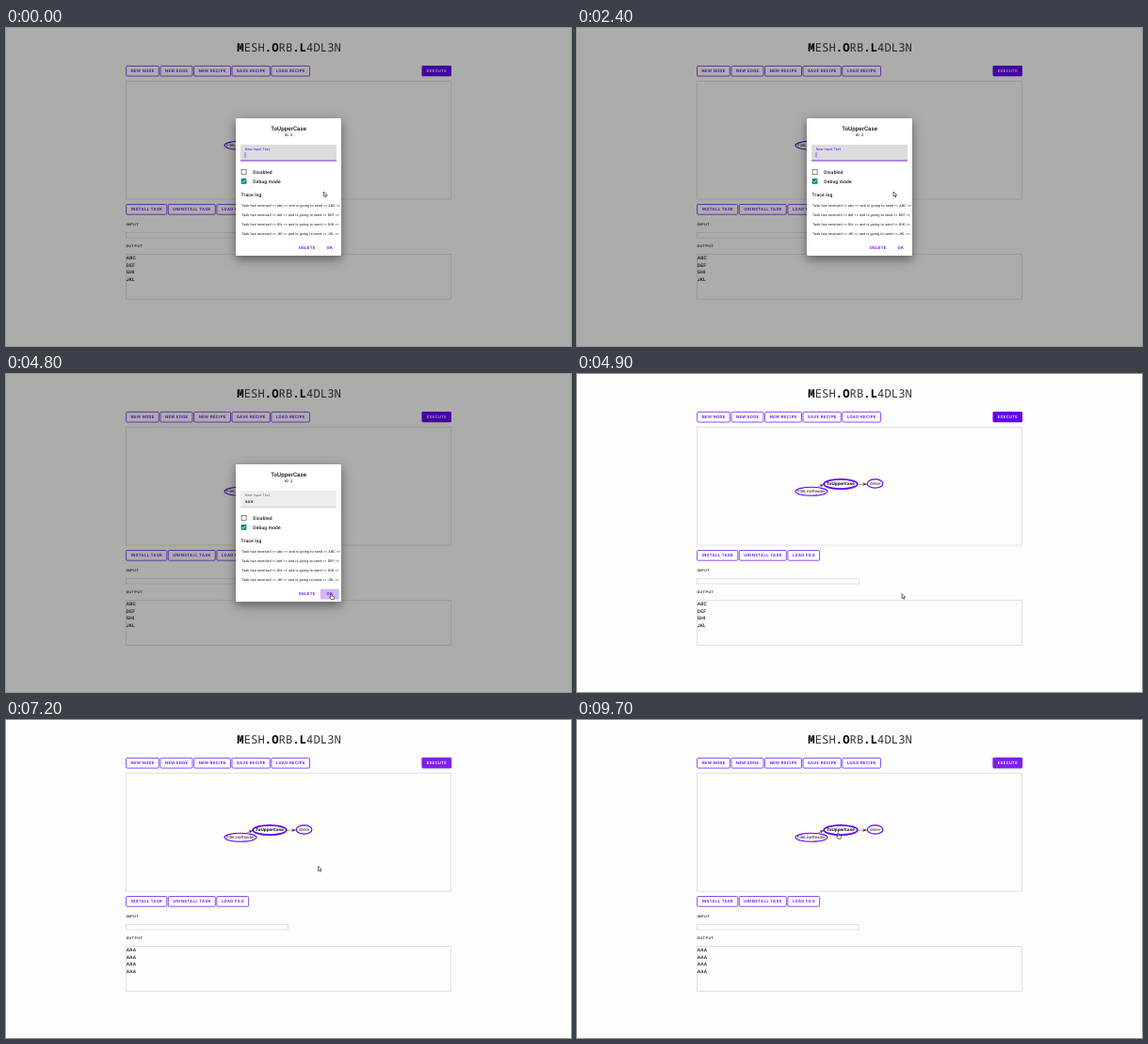
Animation, 600 px wide and 338 px high, one loop 9800 ms. Source, as an HTML page:

```html
<!DOCTYPE html>
<html lang="en">
<head>
<meta charset="utf-8">
<title>Recipe editor</title>
<style>
  html, body { margin: 0; width: 100%; height: 100%; overflow: hidden; background: #fdfdfc; }
  svg { display: block; width: 100vw; height: 100vh; }
  text { font-family: Roboto, sans-serif; text-rendering: geometricPrecision; white-space: pre; }
  .logo { font: 200 12.2px "Noto Sans Mono", monospace; letter-spacing: .06px; fill: #333; }
  .logo tspan { font-weight: 800; fill: #000; }
  .btn { font-size: 4.4px; font-weight: 500; letter-spacing: .39px; fill: #6200ee; }
  .over { font-size: 3.72px; font-weight: 500; letter-spacing: .62px; fill: #111; }
  .body { font-size: 4.96px; font-weight: 500; letter-spacing: .15px; fill: #151515; }
  .head { font-size: 6.2px; font-weight: 500; letter-spacing: .08px; fill: #111; }
  .small { font-size: 3.72px; letter-spacing: .125px; fill: #111; }
  .node { font: 4.4px "Liberation Sans", Arial, sans-serif; fill: #222; }
  .picked { font-weight: 700; font-size: 4.6px; fill: #000; }
  .box { fill: none; stroke: #d6d6d6; stroke-width: .7; }
  .shadow { filter: drop-shadow(0 4px 4px rgba(0,0,0,.3)) drop-shadow(0 2px 7px rgba(0,0,0,.2)); }
</style>
</head>
<body>
<svg id="stage" viewBox="0 0 600 338" preserveAspectRatio="none"></svg>
<script>
const LOOP = 9800, STEP = 100;
const PURPLE = '#6200ee';
const T = { typing: [2500, 2700, 2900], hoverOk: 4000, press: 4600, closed: 4900,
            hoverRun: 6000, run: 6300, leaveRun: 6700, hoverNode: 9100 };

// time, x, y of the pointer tip
const POINTER = [
  [0, 337.5, 174], [1000, 337.5, 174], [1300, 336, 174], [3100, 336, 174],
  [3500, 335.5, 184], [4000, 343.5, 233.5], [4900, 345, 233.5], [5200, 345, 233.5],
  [6000, 457, 46], [6600, 457, 46], [7200, 331.5, 155.5], [8300, 331.5, 155.5],
  [9000, 308, 123], [9100, 277, 120], [LOOP, 277, 120]
];

const attrs = o => Object.entries(o).map(([k, v]) => ` ${k}="${v}"`).join('');
const tag = (name, o, inner = '') => `<${name}${attrs(o)}>${inner}</${name}>`;
const text = (cls, x, y, s, o = {}) => tag('text', { class: cls, x, y, ...o }, s);
const mid = { 'text-anchor': 'middle' };
const rect = (x, y, r, b, o) => tag('rect', { x, y, width: r - x, height: b - y, ...o });
const escape = s => s.replace(/</g, '&lt;').replace(/>/g, '&gt;');

const button = (x, r, y, label) =>
  rect(x, y, r, y + 10.7, { rx: 1.2, fill: '#fff', stroke: PURPLE, 'stroke-width': .7 }) +
  text('btn', (x + r) / 2 + .2, y + 6.9, label, mid);

const node = (x, y, rx, ry, label, picked) =>
  tag('ellipse', { cx: x, cy: y, rx, ry, fill: '#fdfdfc', stroke: PURPLE, 'stroke-width': picked ? 1.7 : 1.1 }) +
  text(picked ? 'node picked' : 'node', x, y + 1.3, label, mid);

const edge = (x1, y1, x2, y2) => {
  const angle = Math.atan2(y2 - y1, x2 - x1) * 180 / Math.PI;
  return tag('path', { d: `M${x1} ${y1}L${x2} ${y2}`, stroke: '#777', 'stroke-width': .6 }) +
    tag('path', { d: 'M0 0L-5 -1.7L-3.8 0L-5 1.7Z', fill: '#444', transform: `translate(${x2} ${y2}) rotate(${angle})` });
};

const page = [
  text('logo', 300.6, 24.5, '<tspan>M</tspan>ESH<tspan>.O</tspan>RB<tspan>.L</tspan>4DL3N', mid),
  button(127.6, 162.3, 40.4, 'NEW NODE'),
  button(164, 198, 40.4, 'NEW EDGE'),
  button(199.6, 238.5, 40.4, 'NEW RECIPE'),
  button(240, 280.3, 40.4, 'SAVE RECIPE'),
  button(281.8, 322.5, 40.4, 'LOAD RECIPE'),
  rect(441.6, 40.1, 473, 51.3, { id: 'run', rx: 1.2 }),
  text('btn', 457.4, 47.3, 'EXECUTE', { ...mid, style: 'fill:#fff' }),
  rect(127.5, 56.5, 472.5, 182, { class: 'box' }),
  edge(253, 121.3, 262.5, 117.2),
  edge(298, 117.5, 308.2, 117),
  node(249, 124.8, 17, 4.5, 'FileLineReader'),
  node(280, 117, 17.8, 5.1, 'ToUpperCase', true),
  node(316.6, 116.5, 8.3, 4.6, 'Writer'),
  button(127.6, 170.8, 187.5, 'INSTALL TASK'),
  button(172.3, 222.3, 187.5, 'UNINSTALL TASK'),
  button(223.9, 257.6, 187.5, 'LOAD FILE'),
  text('over', 127.4, 209.8, 'INPUT'),
  rect(127.5, 217.3, 299.5, 223, { class: 'box' }),
  text('over', 127.4, 233.2, 'OUTPUT'),
  rect(127.5, 240.5, 472.5, 288.2, { class: 'box' }),
  ...[0, 1, 2, 3].map(i => text('body out', 127.8, 246.4 + 7.5 * i, ''))
];

const traces = [['abc', 'ABC'], ['def', 'DEF'], ['Ghi', 'GHI'], ['JKl', 'JKL']];
const dialog = tag('g', { id: 'dialog' }, [
  rect(0, 0, 600, 338, { fill: '#000', opacity: .32 }),
  rect(244, 96, 356, 242, { class: 'shadow', rx: 1.2, fill: '#fff' }),
  text('head', 300.2, 108.5, 'ToUpperCase', mid),
  text('over', 300.2, 115.2, 'ID 2', mid),
  tag('path', { id: 'field', d: 'M249 141.4V125.2Q249 124 250.2 124H349.8Q351 124 351 125.2V141.4Z' }),
  rect(249, 140.6, 351, 141.4, { id: 'underline' }),
  text('small', 253.7, 130, 'New Input Text', { id: 'label' }),
  text('body', 253.7, 136.7, '', { id: 'value', style: 'font-weight:400' }),
  rect(0, 132.2, .6, 137.8, { id: 'caret', fill: PURPLE }),
  rect(250.1, 150.4, 255.1, 155.4, { fill: '#fff', stroke: '#555', 'stroke-width': .7 }),
  rect(249.7, 160, 255.4, 165.7, { rx: .5, fill: '#018786' }),
  tag('path', { d: 'M250.8 163L252 164.2L254.4 161.6', fill: 'none', stroke: '#fff', 'stroke-width': .8 }),
  text('body', 262.3, 154.7, 'Disabled'),
  text('body', 262.3, 164.7, 'Debug mode'),
  text('body', 249.6, 179.3, 'Trace log'),
  ...traces.map(([from, to], i) => text('small', 250, 189.5 + 10 * i,
    escape(`Task has received << ${from} >> and is going to send << ${to} >>`))),
  rect(333.8, 228.4, 353.7, 239.4, { id: 'ok', rx: 1.2, fill: PURPLE }),
  text('btn', 319.8, 235.4, 'DELETE', mid),
  text('btn', 343.9, 235.4, 'OK', mid)
].join(''));

const pointer = tag('g', { id: 'pointer', fill: '#fff', stroke: '#111', 'stroke-width': .6, 'stroke-linejoin': 'round' },
  tag('path', { id: 'arrow', d: 'M0 0V5L1.2 4L2 5.8L2.9 5.4L2.1 3.7H3.7Z' }) +
  tag('path', { id: 'hand', d: 'M0 0Q.6 -.4 1 .2V2.4L3.2 2.9Q3.8 3.1 3.7 3.8L3.2 6.2H.4L-1.4 3.9Q-1.3 3.1 -.6 3.4L0 3.9Z' }));

const stage = document.getElementById('stage');
stage.innerHTML = page.join('') + dialog + pointer;
const $ = id => document.getElementById(id);
const set = (id, o) => { for (const k in o) $(id).setAttribute(k, o[k]); };
const show = (id, on) => set(id, { visibility: on ? 'visible' : 'hidden' });
const outputs = [...document.querySelectorAll('.out')];
const between = (t, a, b) => t >= a && t < b;

function pointerAt(t) {
  const i = Math.max(1, POINTER.findIndex(p => p[0] > t));
  const [t0, x0, y0] = POINTER[i - 1], [t1, x1, y1] = POINTER[i];
  const p = (t - t0) / (t1 - t0), e = p * p * (3 - 2 * p);
  return [x0 + (x1 - x0) * e, y0 + (y1 - y0) * e];
}

function draw(t) {
  const open = t < T.closed, focused = t < T.press;
  const typed = T.typing.filter(k => t >= k).length;
  set('dialog', { display: open ? 'inline' : 'none' });
  set('field', { fill: focused ? '#dcdcdc' : '#ededed' });
  set('underline', { fill: focused ? PURPLE : '#999', y: focused ? 140.6 : 141, height: focused ? .8 : .4 });
  $('label').style.fill = focused ? PURPLE : '#666';
  $('value').textContent = 'a'.repeat(typed);
  set('caret', { x: 253.7 + typed * 2.85, display: focused && t % 1000 < 500 ? 'inline' : 'none' });
  set('ok', { opacity: t < T.hoverOk ? 0 : t < T.press ? .06 : .28 });

  const done = t >= T.run;
  outputs.forEach((line, i) => line.textContent = done ? 'AAA' : traces[i][1]);
  set('run', { fill: done ? '#7f1eee' : between(t, T.hoverRun, T.run) ? '#6f14ef' : PURPLE });
  $('run').style.filter = `drop-shadow(0 .6px ${done ? 1 : .5}px rgba(0,0,0,${done ? .4 : .25}))`;

  const hand = between(t, T.hoverOk, T.closed) || between(t, T.hoverRun, T.leaveRun) || t >= T.hoverNode;
  show('arrow', !hand);
  show('hand', hand);
  set('pointer', { transform: `translate(${pointerAt(t).join(' ')})` });
}

const start = performance.now();
function tick() {
  const t = (performance.now() - start) % LOOP;
  draw(Math.floor(t / STEP) * STEP);
  requestAnimationFrame(tick);
}
tick();
</script>
</body>
</html>
```
